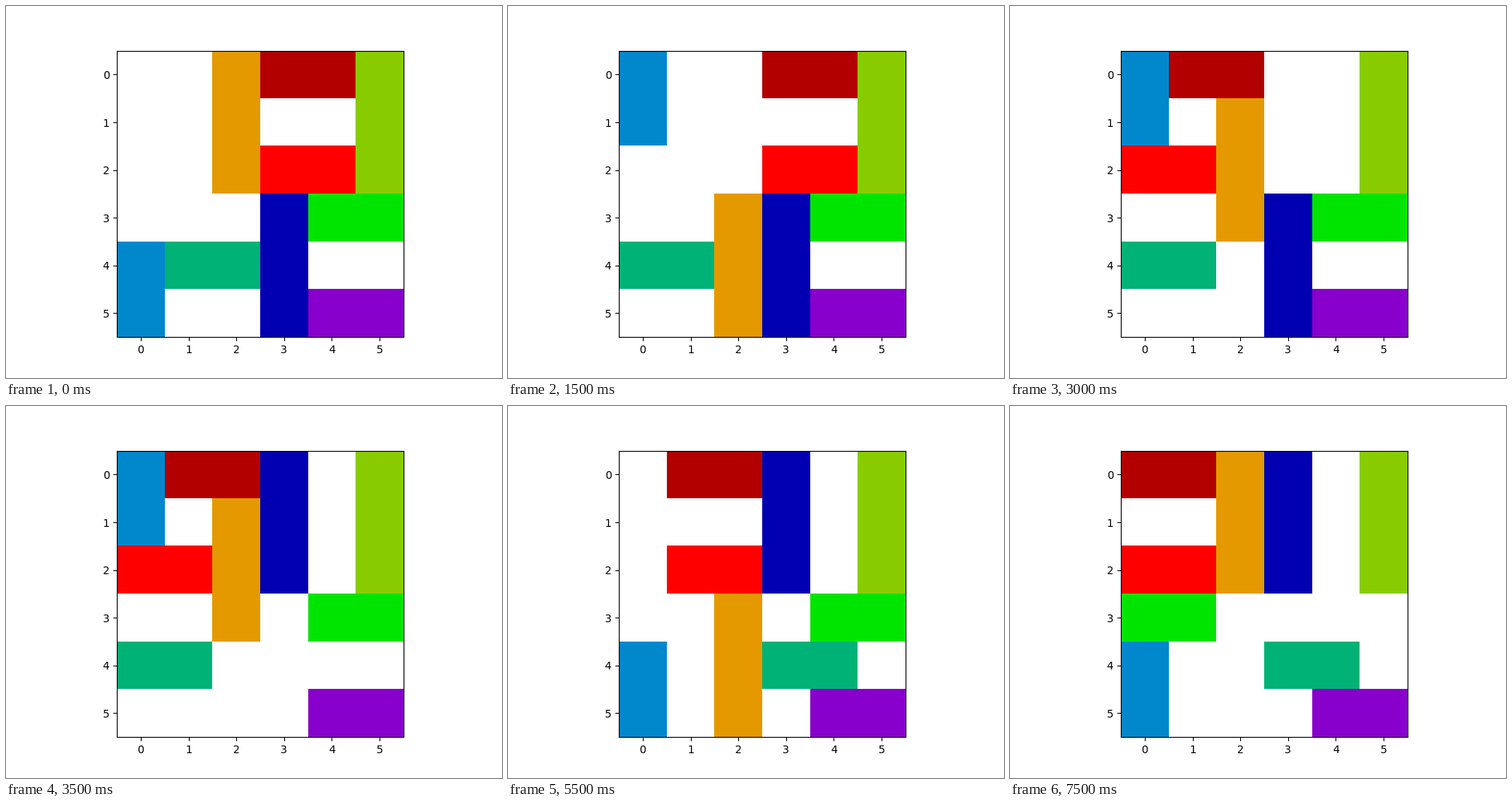
Write a matplotlib script that moves like this. It is 640 px wide and 480 px high and loops after 8000 ms.

```python
from colorsys import hsv_to_rgb

import matplotlib.pyplot as plt
import numpy as np
from matplotlib.animation import FuncAnimation

SIZE = 6
STEP_MS = 500

# name: (hue in degrees, value, row, column, length, vertical)
CARS = {
    "red": (0, 1.0, 2, 3, 2, False),
    "maroon": (0, 0.7, 0, 3, 2, False),
    "orange": (40, 0.9, 0, 2, 3, True),
    "lime": (80, 0.8, 0, 5, 3, True),
    "green": (120, 0.9, 3, 4, 2, False),
    "teal": (160, 0.7, 4, 1, 2, False),
    "blue": (200, 0.8, 4, 0, 2, True),
    "navy": (240, 0.7, 3, 3, 3, True),
    "purple": (280, 0.8, 5, 4, 2, False),
}

# Each move slides one car along its own axis by a number of cells.
MOVES = [
    ("blue", -4), ("teal", -1), ("orange", 3), ("maroon", -2), ("red", -3),
    ("orange", -2), ("navy", -3), ("teal", 3), ("orange", 2), ("red", 1),
    ("blue", 4), ("maroon", -1), ("red", -1), ("orange", -3), ("green", -4),
]


def board(step):
    shift = dict.fromkeys(CARS, 0)
    for name, cells in MOVES[:step]:
        shift[name] += cells
    grid = np.ones((SIZE, SIZE, 3))
    for name, (hue, value, row, col, length, vertical) in CARS.items():
        color = hsv_to_rgb(hue / 360, 1, value)
        if vertical:
            row += shift[name]
            grid[row:row + length, col] = color
        else:
            col += shift[name]
            grid[row, col:col + length] = color
    return grid


fig, ax = plt.subplots(figsize=(6.4, 4.8), dpi=100)
image = ax.imshow(board(0))
ax.set_xticks(range(SIZE))
ax.set_yticks(range(SIZE))


def update(step):
    image.set_data(board(step))
    return [image]


anim = FuncAnimation(fig, update, frames=len(MOVES) + 1, interval=STEP_MS,
                     repeat=True, repeat_delay=0)
plt.show()
```
